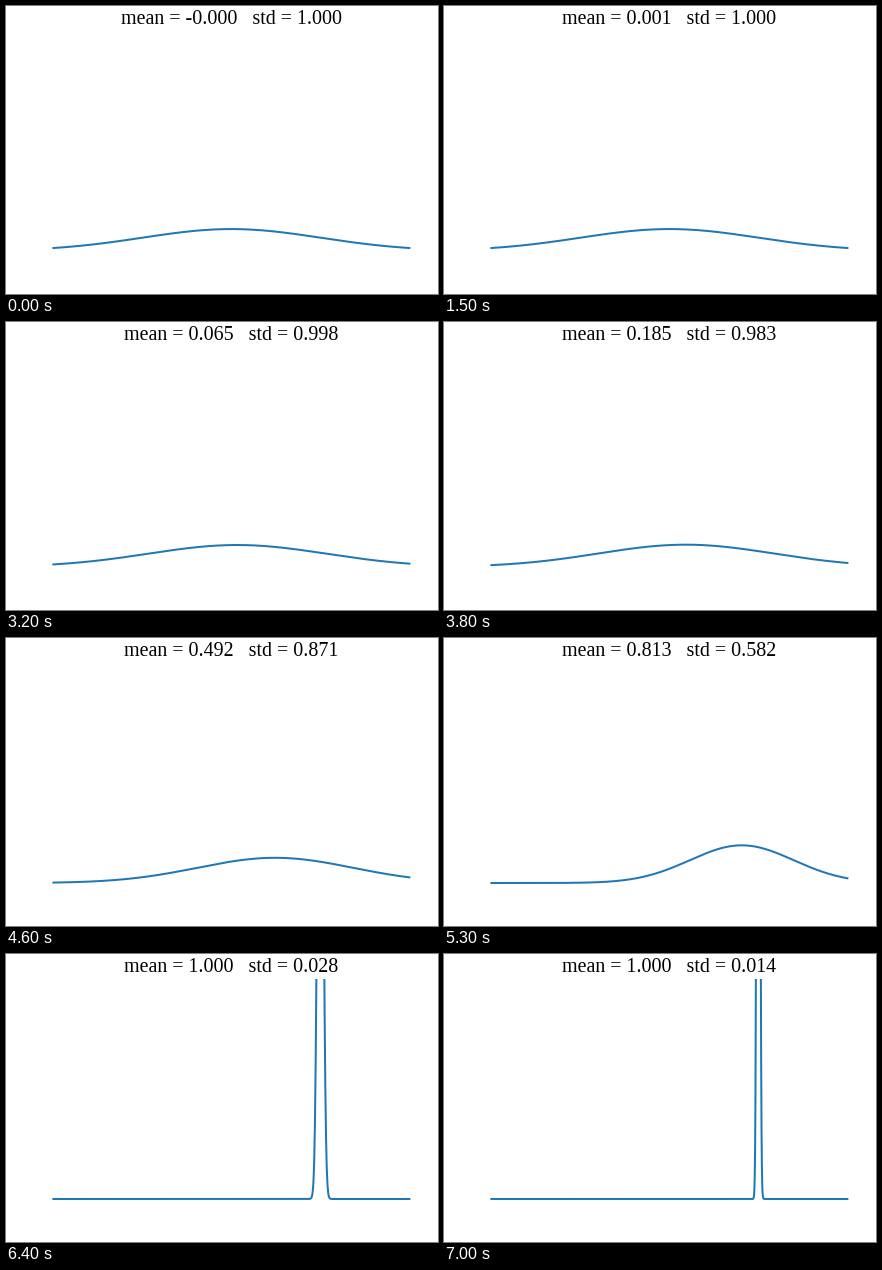
These frames come from a looping animation (432 px wide and 288 px high, 7.1 s). A matplotlib script:

```python
import numpy as np
import matplotlib.pyplot as plt
from matplotlib.animation import FuncAnimation

W, H, DPI = 432, 288, 72
FRAMES, INTERVAL = 71, 100

plt.rcParams["font.family"] = "Liberation Serif"

# Noise added per diffusion step: a linear ramp with a small floor.
steps = np.arange(1, FRAMES + 2)
beta = np.maximum(1e-4, (steps - 11) / 90)
alpha_bar = np.cumprod(1 - beta)

x = np.linspace(-2, 2, 1000)


def moments(i):
    """Mean and standard deviation while the noise is being removed."""
    if i == 0:
        return -0.0, 1.0
    a = alpha_bar[FRAMES - i]
    return np.sqrt(a), np.sqrt(1 - a)


def density(mean, std):
    return np.exp(-0.5 * ((x - mean) / std) ** 2) / (std * np.sqrt(2 * np.pi))


fig = plt.figure(figsize=(W / DPI, H / DPI), dpi=DPI, facecolor="white")
left, top, width, height = 29.6, 25, 391.6, 231
ax = fig.add_axes([left / W, 1 - (top + height) / H, width / W, height / H])
ax.set_xlim(-2.2, 2.2)
ax.set_ylim(-0.2, 4)
ax.axis("off")

curve, = ax.plot([], [], color="tab:blue", lw=2)
title = ax.set_title("", fontsize=20, pad=7)


def update(i):
    mean, std = moments(i)
    curve.set_data(x, density(mean, std))
    title.set_text(f"mean = {mean:.3f}   std = {std:.3f}")
    return curve, title


anim = FuncAnimation(fig, update, frames=FRAMES, interval=INTERVAL,
                     init_func=lambda: update(0), repeat=True, repeat_delay=0)
plt.show()
```
